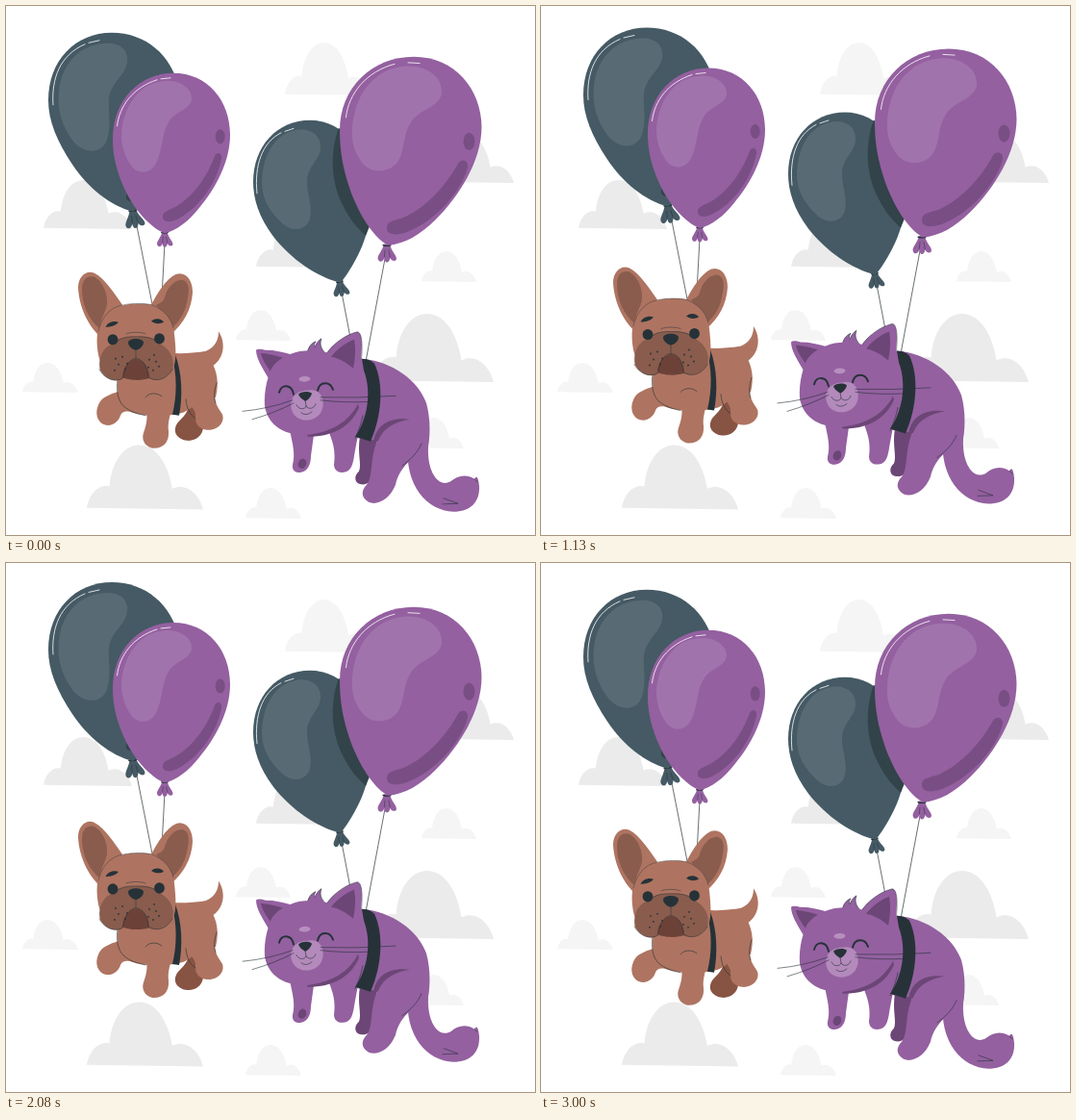
An HTML page with a canvas that plays this animation: 550 px wide and 550 px high, repeating every 3040 ms.

```html
<!DOCTYPE html>
<html lang="en">
<head>
<meta charset="utf-8">
<title>Floating pets</title>
<style>
html, body { margin: 0; width: 100%; height: 100%; overflow: hidden; background: #fff; }
canvas { display: block; width: 550px; height: 550px; }
</style>
</head>
<body>
<canvas id="stage"></canvas>
<script>
const LOOP = 3040, STEP = 1000 / 24;
const INK = '#263238', SLATE = '#455a64', PURPLE = '#9460a0', PLUM = '#6c4676';
const TAN = '#ae7461', BROWN = '#895c4d', LIGHT = '#ebebeb', PALE = '#f5f5f5';

const canvas = document.getElementById('stage');
const ctx = canvas.getContext('2d');
const ratio = window.devicePixelRatio || 1;
canvas.width = canvas.height = 550 * ratio;

const cache = new Map();
function path(d) {
  if (!cache.has(d)) cache.set(d, new Path2D(d));
  return cache.get(d);
}
function fill(d, color) {
  ctx.fillStyle = color;
  ctx.fill(path(d));
}
function line(d, width = 0.7, color = INK) {
  ctx.strokeStyle = color;
  ctx.lineWidth = width;
  ctx.stroke(path(d));
}
function oval(x, y, rx, ry, color, turn = 0) {
  ctx.fillStyle = color;
  ctx.beginPath();
  ctx.ellipse(x, y, rx, ry, turn, 0, 7);
  ctx.fill();
}

function cloud(x, y, w, h, color) {
  ctx.save();
  ctx.translate(x, y);
  ctx.scale(w, h);
  fill('M0,.975 C.02,.76 .1,.6 .195,.64 C.21,.28 .31,0 .45,0 C.6,0 .7,.3 .735,.68 C.85,.58 .965,.75 1,1Z', color);
  ctx.restore();
}

function clouds() {
  cloud(290, 38, 90, 55, PALE);
  cloud(39, 181, 92, 51, LIGHT);
  cloud(436, 133, 92, 51, LIGHT);
  cloud(260, 221, 92, 51, LIGHT);
  cloud(432, 255, 57, 32, PALE);
  cloud(239, 316, 57, 32, PALE);
  cloud(17, 371, 58, 31, PALE);
  cloud(381, 320, 126, 71, LIGHT);
  cloud(419, 428, 57, 32, PALE);
  cloud(84, 456.5, 121, 67, LIGHT);
  cloud(249, 501, 58, 32, PALE);
}

function knot(x, y, size, turn, color) {
  ctx.save();
  ctx.translate(x, y);
  ctx.rotate(turn);
  ctx.scale(size, size);
  fill('M-2.5,-1 C-3,4 -8,8 -7,11 C-6,14 -3,13 -2,10 C-2,14.5 2,14.5 2.5,10 C4,13 8,13 7.5,10 C7,7 3,4 2.5,-1Z', color);
  line('M-3,-.2 Q0,1 3,-.2', 1);
  line('M-1.5,4 L-2,9 M1.5,4 L2.4,9', 0.4);
  ctx.restore();
}

function balloon(color, body, shine, rim, shade) {
  const dark = color === SLATE;
  fill(body, color);
  fill(shade, dark ? '#32434a' : '#794e84');
  fill(shine, dark ? 'rgba(255,255,255,.1)' : 'rgba(255,255,255,.12)');
  line(rim, 0.8, '#fff');
}

function dogBalloons() {
  line('M136,228 L152,309 M165,246 L162,302');
  knot(132, 212, 1.38, -0.15, SLATE);
  balloon(SLATE,
    'M132,213 C108,207 85,188 69,164 C53,140 44,119 44,97 C44,56 72,27 110,27 C145,27 172,50 180,85 C186,115 160,180 137,209Z',
    'M104,38 C120,37 128,47 126,58 C124,72 109,78 107,96 C106,112 110,122 105,138 C100,153 82,154 70,140 C58,124 53,108 55,88 C58,58 78,39 104,38Z',
    'M49,102 C47,75 56,50 82,39 M86,37.5 L97,35',
    'M125,193 C128,190 131,194 135,201 C131,204 126,202 125,199Z');
  knot(165, 235, 1.12, 0, PURPLE);
  balloon(PURPLE,
    'M165,235.5 C150,230 132,209 124,191 C115,172 111,155 111,138 C111,98 138,69 174,69 C210,69 233,98 233,133 C233,162 217,190 201,209 C190,223 177,233 165,235.5Z',
    'M160,78 C178,74 193,84 193,95 C193,107 176,108 169,120 C162,132 163,145 158,158 C153,174 138,176 130,165 C123,155 120,145 120,132 C122,104 138,81 160,78Z',
    'M115.5,124 C118,103 132,84 157,76 M161,75 L171,74',
    'M217,155 C220,150 225,152 224,158 C219,184 200,210 178,221 C170,225 162,224 163,217 C164,212 172,211 178,207 C196,196 210,175 217,155Z');
  oval(222.7, 135, 5, 7.5, '#794e84');
}

function dog() {
  // Tail, body and legs
  fill('M191,412 C189,425 180,429 177,435 C173,444 180,450 188,451 C197,452 204,446 205,438 L206,418Z', '#875443');
  fill('M196,360 C211,360 221,352 221,337.5 C229,350 227,366 214,374 L200,376Z', TAN);
  fill('M118,380 C114,395 116,408 122,416 C130,424 145,426 165,425 C180,424 190,422 197,412 L218,406 C222,390 219,378 213,368 L206,358.5 C195,360 182,361 172,360Z', TAN);
  fill('M218,394 C214,412 222,418 225,424 C228,433 219,441 209,440 C200,439 196,433 197,425 C198,420 190,414 187,404Z', TAN);
  fill('M117,400 C108,403 99,406 96,414 C92,423 95,433 104,435 C112,436 117,431 119,425 C121,420 126,420 132,422Z', TAN);
  fill('M144,408 C148,425 147,432 143,443 C140,452 147,459 154,459 C164,459 170,452 169,441 C168,433 170,428 172,418Z', TAN);
  line('M116,387 C114,400 117,410 122,415 C129,421 136,423 145,425', 0.6);
  line('M145,406 C149,401 157,401 162,405 M187,408 C188,418 191,424 197,428 M219,391 C216,400 216,406 218,412', 0.6);
  fill('M172,363 C178,380 178,405 173,424 L180,425 C184,405 183,380 176,362Z', INK);

  // Ears and head
  fill('M100,345 C88,335 76,315 75,292 C75,280 84,273 92,277 C103,283 112,297 121,310Z', TAN);
  fill('M98,335 C85,325 79,308 79,294 C79,283 85,279 92,281 C101,286 106,299 105,309 C104,318 98,323 98,335Z', BROWN);
  fill('M150,312 C157,298 166,283 177,278 C187,275 194,284 194,297 C193,315 184,330 172,340Z', TAN);
  fill('M165,302 C168,292 174,285 182,284 C190,284 191,294 189,302 C187,318 180,328 171,335 C169,325 162,318 156,310 C161,308 164,306 165,302Z', BROWN);
  fill('M120,311 C128,308 145,308 152,310 C165,315 174,325 175,340 C177,358 177,368 174,376 C168,385 150,388 135,388 C115,388 100,380 96,362 C94,350 94,340 97,333 C100,322 108,313 120,311Z', TAN);
  line('M96,337 C100,322 108,313 120,310.5 C130,308 143,308 152,310 C163,315 171,322 174,334', 0.4);

  // Face
  fill('M135,343 C146,342 155,344 160,350 C170,356 176,365 173,377 C166,389 155,390 147,386 C142,383 128,383 123,386 C117,391 104,389 98,378 C95,366 101,354 110,351 C116,344 124,343 135,343Z', BROWN);
  fill('M121,385 C121,377 127,367 135,366.5 C144,367 149,377 149,386 C143,389 127,389 121,385Z', '#6c4238');
  line('M97,377 C103,389 117,391 122,385 C123,375 128,366 135,366 C143,366 147,375 148,385 C157,391 168,387 173,377', 0.5);
  line('M135,354 L135,366 M112,351 C118,344 124,343 135,343 C146,343 154,344 160,351 M125,340 C130,338 140,338 145,340', 0.5);
  fill('M127,349 C128,344 142,344 143,349 C143,353 138,357 135,357 C132,357 127,353 127,349Z', INK);
  oval(111, 346, 5.4, 5.6, INK);
  oval(159.5, 345, 5.4, 5.6, INK);
  fill('M103.5,333 C106,328 112,326 117,328 C114,332 108,333 103.5,333Z', INK);
  fill('M151,327 C155,323 162,324 164,328 C160,330 155,330 151,327Z', INK);
  for (const [x, y] of [[114, 366], [121, 364], [117, 372], [126, 371], [113, 378], [124, 377],
                        [149, 367], [156, 369], [148, 375], [159, 374], [153, 378], [154, 362]]) {
    oval(x, y, 0.9, 0.9, INK);
  }
}

function catBalloons() {
  line('M349,297 L358,344 M394,262 L374,369');
  knot(347, 286, 1.15, -0.15, SLATE);
  balloon(SLATE,
    'M348,287 C323,281 297,263 278,239 C263,219 257,200 257,182 C257,145 282,118 316,118 C350,118 380,150 380,200 C380,235 365,265 348,287Z',
    'M303,128 C317,126 328,134 327,147 C326,160 313,166 313,182 C313,196 319,206 316,220 C313,232 299,235 288,226 C274,213 266,200 266,182 C267,152 281,131 303,128Z',
    'M261,194 C258,165 266,141 286,131 M290,129.5 L299,126.5',
    'M346,126 C337,150 337,182 351,208 C358,222 366,231 374,238 L379,226 L370,150Z');
  knot(396, 248, 1.32, 0, PURPLE);
  balloon(PURPLE,
    'M397,248 C382,240 367,216 358,191 C350,168 347,150 347,128 C347,85 380,52 424,52 C466,52 494,85 494.5,125 C494.5,160 471,197 447,221 C431,237 414,247 397,248Z',
    'M414,62 C436,60 453,72 453,88 C453,104 430,106 421,120 C412,134 415,148 408,160 C400,173 380,174 371,163 C362,152 359,140 360,127 C362,92 382,65 414,62Z',
    'M353.5,115 C356,90 375,67 404,59.5 M418,58 L430,58.7',
    'M470,163 C474,157 481,160 480,167 C473,193 447,221 422,232 C410,238 396,239 396,230 C396,222 406,222 414,219 C438,208 458,185 470,163Z');
  oval(481.5, 140, 6, 9, '#794e84');
}

function cat() {
  // Tail, body and legs
  fill('M368,446 C365,465 370,475 367,483 C362,487 362,494 367,496 C374,498 380,495 380,487 L386,450Z', PLUM);
  fill('M418,455 C414,498 438,524 465,525 C483,525 493,515 492,498 C491,488 489,487 487,491 C478,485 469,488 463,493 C457,497 450,495 446,489 C438,477 438,463 440,441Z', PURPLE);
  fill('M340,380 L370,366 C402,369 428,388 437,412 C442,430 441,450 438,462 L420,472 C413,478 407,487 405,497 C399,512 386,519 377,515 C369,510 369,503 375,497 C382,488 378,470 386,451 L362,448 L340,440Z', PURPLE);
  fill('M382,455 C383,436 398,426 420,429 C405,431 392,438 387,451Z', PLUM);
  line('M432,454 C428,464 420,471 412,477 M455,511 L470,516.5 L454,517 M487,491 L490,494', 0.6);
  fill('M295,440 C298,455 301,465 298,476 C297,483 302,485 307,484 C314,483 317,475 317,467 L321,438Z', PURPLE);
  oval(308, 475, 4.2, 5.2, PLUM, 0.4);
  fill('M334,438 C340,452 343,462 341,476 C341,482 346,485 351,484 C359,484 361,474 362,467 C364,455 367,440 371,420Z', PURPLE);
  line('M371,425 C369,435 366,442 363,449', 0.6);
  fill('M370,366 C377,366 381,369 383,371 C393,392 391,425 379,452 L363,447 C375,430 381,402 372,378Z', INK);

  // Ears and head
  fill('M312,444 C338,442 356,432 366,413 L367,417 C358,437 340,447 314,447Z', PLUM);
  fill('M274,388 C266,375 260,365 260,357 C262,355 266,356 270,357 C280,357 288,359 298,362Z', PURPLE);
  fill('M275,379 C270,372 266,366 265,360 C274,361 283,363 291,366 C284,368 277,372 275,379Z', PLUM);
  fill('M332,362 C340,350 353,341 365,338 C370,338 371,350 369,366 C369,375 368,382 364,388Z', PURPLE);
  line('M333,361 C340,350 353,341 365,338 C370,338 371,350 369.5,366', 0.5);
  const tuft = 'M313,361 C314,354 317,350 322,348 C320,351 320,353 321,354 C323,349 325,347 328,345 C326,350 327,355 332,360';
  fill(tuft, PURPLE);
  line(tuft, 0.6);
  fill('M296,361 C310,355 330,357 345,363 C358,370 368,385 367,402 C365,425 345,441 315,445 C290,447 272,435 269,415 C268,400 272,380 280,371 C285,366 290,363 296,361Z', PURPLE);
  fill('M338,364 C345,355 354,349 362,346 C364,356 363,366 361,376 C354,370 346,365 338,364Z', PLUM);

  // Face
  oval(310.5, 387, 6, 2.8, '#b78fbf', -0.05);
  line('M284,401 C286,392 297,392 299,403 M324,399 C326,389 337,389 340,398', 2);
  fill('M313,399 C326,396 331,406 329.5,416 C326,434 301,434 297,419 C294,408 301,399 313,399Z', '#b38abb');
  fill('M304,403 C306,400 315,399 318,402 C317,406 313,410 311,410 C308,408 305,406 304,403Z', INK);
  line('M311,409 L312,415 M302,414 C304,419 311,419 312,415 C314,419 321,418 322,413 M307,422 C310,425 315,424 318,421', 0.6);
  line('M298,409 Q273,418 246,420.5 M299,412 Q280,422 256,429 M327,406 Q366,407 405,404.5 M327,409 Q352,412 379,410.5', 0.6);
}

// Steady rise and fall: 0 at the lowest point, 1 at the highest
function lift(t, period) {
  const p = ((t + 22) / period) % 1;
  return 1 - Math.abs(2 * p - 1);
}

function floating(dy, ...parts) {
  ctx.save();
  ctx.translate(0, dy);
  parts.forEach(part => part());
  ctx.restore();
}

function draw(now) {
  const t = Math.floor((now % LOOP + 2) / STEP) * STEP;
  ctx.setTransform(ratio, 0, 0, ratio, 0, 0);
  ctx.fillStyle = '#fff';
  ctx.fillRect(0, 0, 550, 550);
  ctx.lineCap = ctx.lineJoin = 'round';
  clouds();
  floating(1.1 - 11.4 * lift(t, LOOP / 2), dogBalloons, dog);
  floating(1 - 11.4 * lift(t, LOOP), catBalloons, cat);
}

const start = performance.now();
function tick() {
  draw(performance.now() - start);
  requestAnimationFrame(tick);
}
tick();
</script>
</body>
</html>
```
